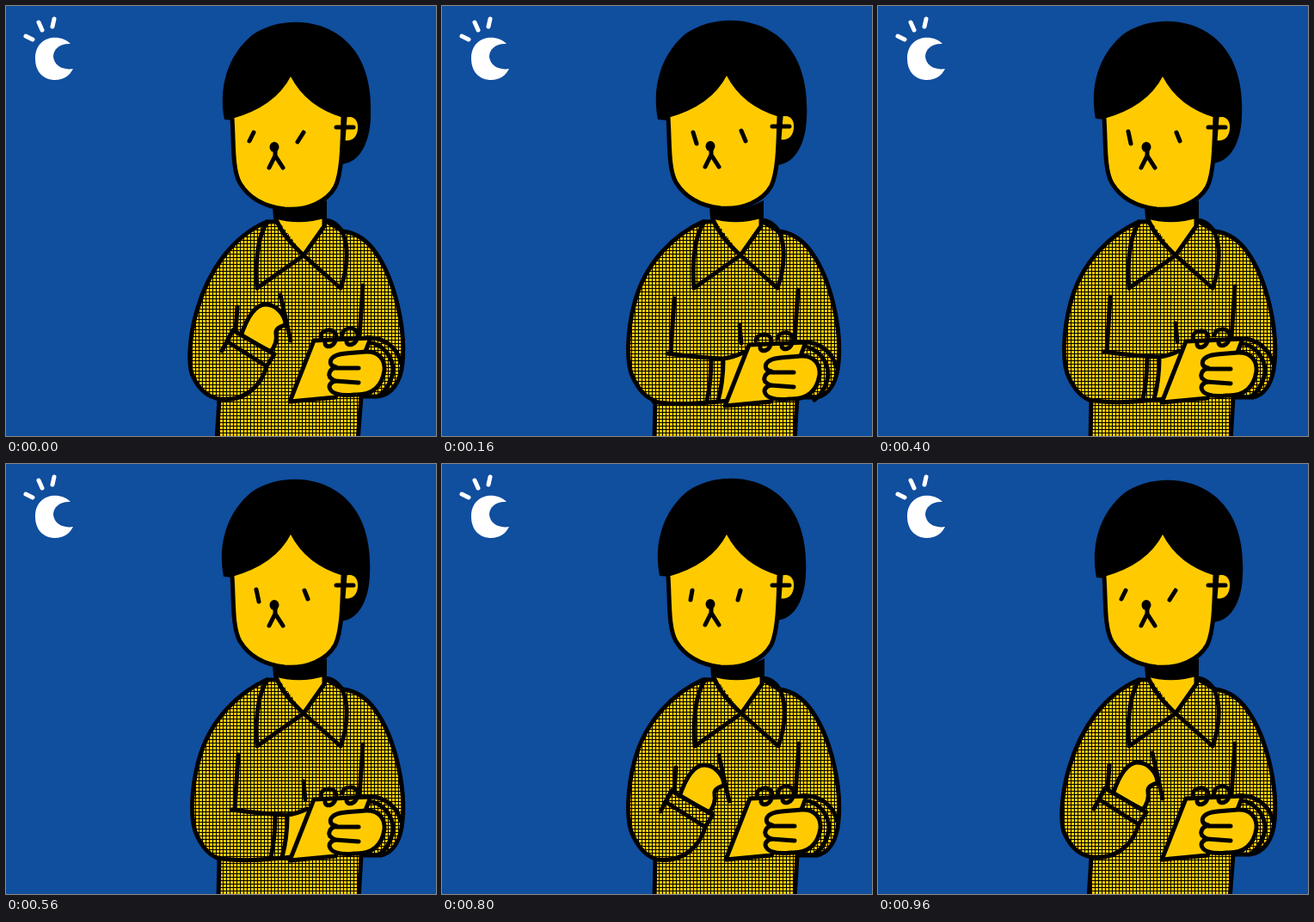
Write an HTML page without scripts that moves like this. It is 500 by 500 pixels and loops after 1.04 s.

```html
<!DOCTYPE html>
<html lang="en">
<head>
<meta charset="utf-8">
<title>Taking notes at night</title>
<style>
  html, body { margin: 0; width: 100%; height: 100%; overflow: hidden; background: #104e9e; }
  svg { display: block; width: 100%; height: 100%; }
  .ink { fill: none; stroke: #000; stroke-width: 5; stroke-linecap: round; stroke-linejoin: round; }
  .skin { fill: #ffcb00; }
  .cloth { fill: url(#weave); }
  .pose { visibility: hidden; animation: 1040ms step-end infinite; }
  .rest { animation-name: rest; }
  .blink { animation-name: blink; }
  .lift { animation-name: lift; }
  .press { animation-name: press; }
  .write { animation-name: write; }
  .slide { animation-name: slide; }
  /* 13 steps of 80 ms, 7.692% each */
  @keyframes rest { 0%, 92.308%, 100% { visibility: visible } 7.692% { visibility: hidden } }
  @keyframes lift { 0%, 15.385%, 84.615%, 100% { visibility: hidden } 7.692%, 76.923% { visibility: visible } }
  @keyframes press {
    0%, 23.077%, 38.462%, 53.846%, 69.231%, 100% { visibility: hidden }
    15.385%, 30.769%, 46.154%, 61.538% { visibility: visible }
  }
  @keyframes write {
    0%, 30.769%, 46.154%, 61.538%, 100% { visibility: hidden }
    23.077%, 38.462%, 53.846% { visibility: visible }
  }
  @keyframes slide { 0%, 76.923%, 100% { visibility: hidden } 69.231% { visibility: visible } }
  @keyframes blink { 0%, 92.308%, 100% { visibility: hidden } 84.615% { visibility: visible } }
</style>
</head>
<body>
<svg viewBox="0 0 500 500">
  <defs>
    <pattern id="weave" width="4" height="4" patternUnits="userSpaceOnUse">
      <path d="M0 0h4v4h-4z"/>
      <path class="skin" d="M1 1h3v3h-3z" shape-rendering="crispEdges"/>
    </pattern>

    <path id="hair" d="M254 132C247 96 257 58 286 34C316 13 362 14 390 36C416 56 426 90 424 130C423 158 412 182 390 184L300 150L266 133Z"/>

    <g id="face">
      <path class="skin" d="M263 131Q313 117 331 82Q349 117 392 130C391 160 391 192 383 210C373 228 350 238 324 236C298 233 281 221 272 206C263 190 265 160 263 131Z"/>
      <path class="ink" d="M263 131C265 160 263 190 272 206C281 221 298 233 324 236C350 238 373 228 383 210C391 192 391 160 392 130"/>
      <path class="skin" d="M394 130C405 126 410 134 409 143C408 153 402 158 392 156Z"/>
      <path class="ink" d="M384 141H404M394 130L392 156"/>
    </g>

    <g id="mouth">
      <ellipse cx="312" cy="164" rx="5.5" ry="6"/>
      <path class="ink" d="M313 168V174L306 188M313 174L322 188"/>
    </g>

    <g id="neck">
      <path class="skin" d="M314 246L346 289L370 255V240Z"/>
      <path d="M310 233Q345 242 373 226V246Q342 256 311 247Z"/>
      <path class="ink" d="M370 240V256L346 290L292 328C290 305 291 270 304 251M314 248Q322 268 346 290L389 328C398 305 400 270 386 256Q380 250 372 249"/>
    </g>

    <path id="upBody" class="ink cloth" style="fill:url(#weave)" d="M303 251C264 268 236 306 222 354C213 385 211 420 218 432C226 449 238 455 248 457L245 506H409L413 454H432C448 452 459 438 461 415C465 375 452 318 430 287Q415 265 392 262L372 250Z"/>
    <path id="downBody" class="ink cloth" style="fill:url(#weave)" d="M303 251C272 265 237 296 224 345C215 378 214 416 222 432C230 449 239 456 248 459L247 506H410L413 455H436C450 452 459 438 461 415C465 375 452 318 430 287Q415 265 392 262L372 250Z"/>

    <g id="raised">
      <path class="ink" d="M269 350L267 378M251 401L264 377M248 457C276 460 297 444 304 416"/>
      <path class="ink" style="fill:#ffcb00" d="M273 384C279 366 288 347 302 347C313 347 325 358 325 371Q313 374 314 381Q316 391 308 402Z"/>
      <path class="ink" d="M319 336L331 389"/>
      <path class="ink" style="fill:url(#weave)" d="M264 377L312 405L303 419L257 390Z"/>
    </g>

    <g id="lowered">
      <path class="skin" d="M327 410L350 402L360 396L335 460L321 458Z"/>
      <path class="ink" d="M270 338L266 402M262 402Q300 407 326 408Q338 407 350 401M313 407Q313 435 308 457M327 410Q327 435 321 457M246 458C274 463 302 460 333 457M346 369L348 390"/>
    </g>

    <g id="tucked">
      <path class="skin" d="M328 407Q340 394 354 402L340 438L327 441Z"/>
      <path class="ink" d="M270 339L267 400M259 402L322 398Q326 398 327 404L326 432M310 401Q312 428 307 452M328 406Q338 395 350 401M327 441L337 434M247 459C278 462 304 455 327 447M342 368L344 391"/>
    </g>

    <g id="pad">
      <path class="ink" d="M415 325L411 385M418 386C440 384 455 398 459 414M427 392C444 398 453 415 449 430Q445 445 434 453"/>
      <path class="ink" style="fill:#ffcb00" d="M358 389L424 386L416 407L383 455L330 460Z"/>
      <path class="ink" style="fill:#ffcb00" d="M418 402C434 401 441 412 440 424C437 443 425 453 405 452C387 454 377 450 376 443Q376 438 383 436Q374 432 376 427Q377 422 384 420Q375 418 378 411C383 403 397 404 418 402Z"/>
      <path class="ink" d="M384 421H410M383 436L410 438"/>
      <path id="ring" class="ink" d="M366 384C367 375 383 374 384 384C383 398 371 398 371 392"/>
      <use href="#ring" x="25" y="-2"/>
    </g>
  </defs>

  <path fill="#104e9e" d="M0 0h500v500h-500z"/>
  <path fill="#fff" d="M75 44C62 31 34 35 34 61C34 78 45 86 57 86C67 86 74 81 78 73C66 75 56 69 55 59C55 50 63 43 75 44Z"/>
  <path fill="none" stroke="#fff" stroke-width="5" stroke-linecap="round" d="M23 35L31 39M38 19L42 28M56 15L54 24"/>

  <g class="pose rest">
    <use href="#upBody"/><use href="#neck"/>
    <use href="#hair"/><use href="#face"/><use href="#mouth"/>
    <path class="ink" d="M288 147L283 157M346 147L339 158"/>
    <use href="#raised"/><use href="#pad"/>
  </g>

  <g class="pose blink">
    <use href="#upBody"/><use href="#neck"/>
    <use href="#hair" y="-1"/><use href="#face"/><use href="#mouth"/>
    <path class="ink" d="M290 147L286 158M347 147L342 158"/>
    <use href="#raised" x="1" y="1"/><use href="#pad"/>
  </g>

  <g class="pose lift">
    <use href="#downBody"/><use href="#neck" x="2"/>
    <use href="#hair" x="-1" y="-2"/><use href="#face"/><use href="#mouth" y="-1"/>
    <path class="ink" d="M291 147L289 158M347 147L344 158"/>
    <use href="#raised" x="3" y="3"/><use href="#pad"/>
  </g>

  <g class="pose press">
    <use href="#downBody"/><use href="#neck" x="1"/>
    <use href="#hair" transform="matrix(1.018 0 0 1.02 -7.6 -2.6)"/><use href="#face" y="-1"/><use href="#mouth" y="-1"/>
    <path class="ink" d="M292 147L296 160M348 145L353 157"/>
    <use href="#lowered" y="2"/><use href="#pad" x="-1" y="5"/>
  </g>

  <g class="pose write">
    <use href="#downBody"/><use href="#neck"/>
    <use href="#hair" x="-1" y="-1"/><use href="#face"/><use href="#mouth"/>
    <path class="ink" d="M291 146L294 160M347 147L351 157"/>
    <use href="#lowered"/><use href="#pad" y="1"/>
  </g>

  <g class="pose slide">
    <use href="#downBody"/><use href="#neck" x="2"/>
    <use href="#hair" y="-3"/><use href="#face" x="-1"/><use href="#mouth" x="-1" y="-1"/>
    <path class="ink" d="M292 148L294 159M347 146L350 156"/>
    <use href="#tucked"/><use href="#pad" x="3"/>
  </g>
</svg>
</body>
</html>
```
